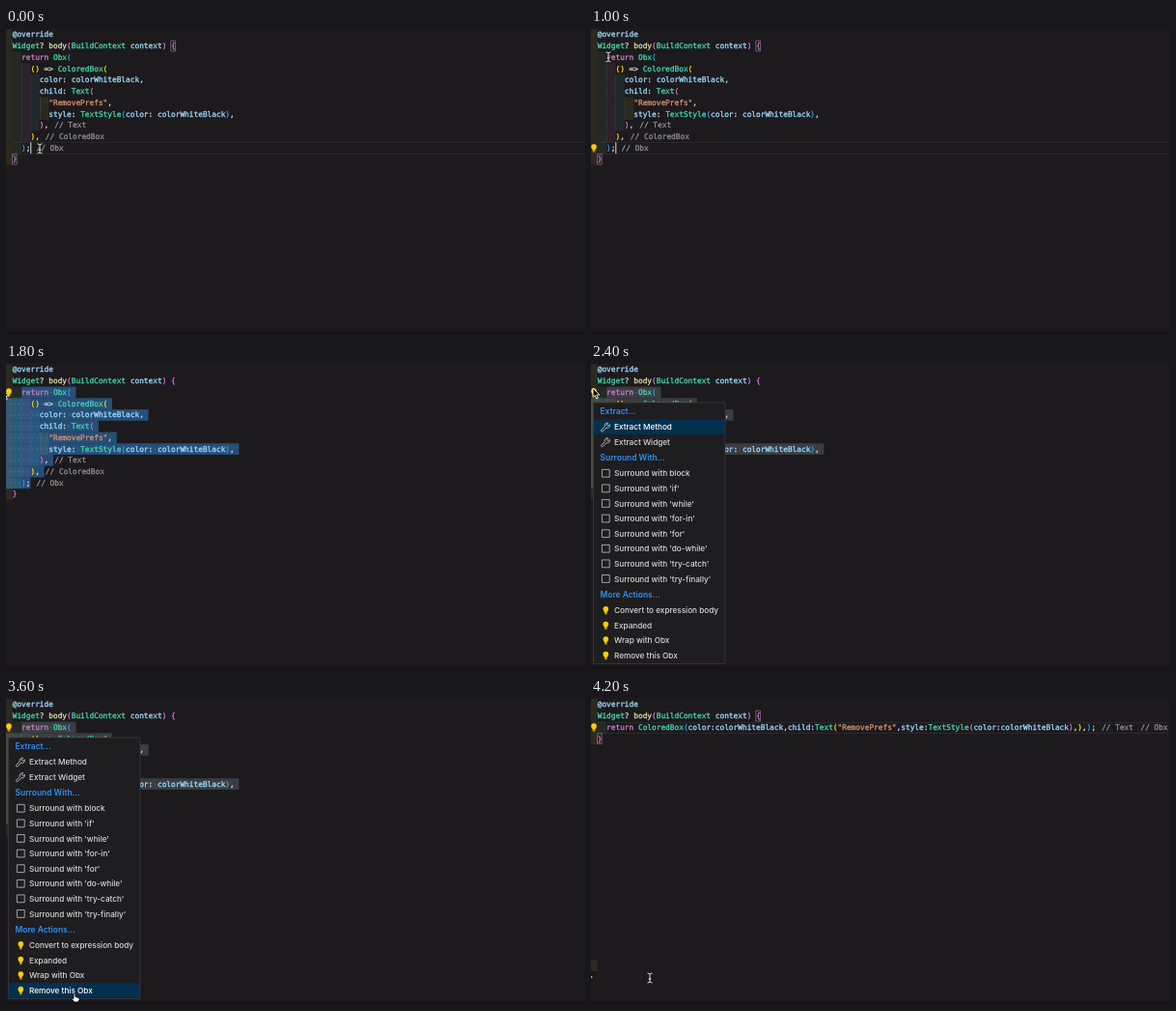
An HTML page with a canvas for the animation above (4300 ms loop, 600 by 318 pixels).

```html
<!DOCTYPE html>
<html lang="en">
<head>
<meta charset="utf-8">
<title>Editor quick fix</title>
<style>
  html, body { margin: 0; width: 600px; height: 318px; overflow: hidden; background: #1c1a1c; }
  canvas { display: block; }
</style>
</head>
<body>
<canvas id="stage" width="600" height="318"></canvas>
<script>
const ctx = document.getElementById('stage').getContext('2d');
const LOOP = 4300, STEP = 100;
const LEFT = 6.7, CHAR = 4.695, LINE = 11.73, TOP = 1.1;
const CODE_FONT = '7.8px "DejaVu Sans Mono", monospace';
const BRACKETS = ['#ffd700', '#da70d6', '#2b9df4'];
const INDENTS = ['255,255,64', '127,255,127', '255,127,255', '79,236,236'];

// Each line: indent, code, closing labels
const before = [
  [0, '@override'],
  [0, 'Widget? body(BuildContext context) {'],
  [2, 'return Obx('],
  [4, '() => ColoredBox('],
  [6, 'color: colorWhiteBlack,'],
  [6, 'child: Text('],
  [8, '"RemovePrefs",'],
  [8, 'style: TextStyle(color: colorWhiteBlack),'],
  [6, '),', '// Text'],
  [4, '),', '// ColoredBox'],
  [2, ');', '// Obx'],
  [0, '}']
];
const after = [
  before[0], before[1],
  [2, 'return ColoredBox(color:colorWhiteBlack,child:Text("RemovePrefs",style:TextStyle(color:colorWhiteBlack),),);', '// Text', '// Obx'],
  [0, '}']
];

const MENU = { x: 2.5, y: 41, w: 136.5, h: 270.5, pad: 0.55, head: 16.9, item: 15.6 };
let menuBottom = MENU.y + MENU.pad;
const menu = ['#Extract...', 'Extract Method', 'Extract Widget', '#Surround With...',
  'Surround with block', "Surround with 'if'", "Surround with 'while'", "Surround with 'for-in'",
  "Surround with 'for'", "Surround with 'do-while'", "Surround with 'try-catch'",
  "Surround with 'try-finally'", '#More Actions...', 'Convert to expression body',
  'Expanded', 'Wrap with Obx', 'Remove this Obx'].map(entry => {
  const heading = entry[0] === '#', height = heading ? MENU.head : MENU.item;
  menuBottom += height;
  return { label: entry.replace('#', ''), heading, bottom: menuBottom, y: menuBottom - height / 2 };
});

// Pointer keys: time, x, y
const path = [[0, 35, 125], [200, 35, 125], [900, 18, 30], [1300, 18, 30], [1700, -4, 27],
  [2000, -4, 27], [2300, 2, 26], [2400, 2, 26], [2900, 64, 260.5], [3100, 64, 260.5],
  [3500, 71, 306], [3800, 71, 306], [4100, 61, 290], [4300, 61, 290]];

const colX = col => LEFT + col * CHAR;
const rowY = row => TOP + row * LINE;

function rect(color, x, y, w, h) {
  ctx.fillStyle = color;
  ctx.fillRect(x, y, w, h);
}

function text(str, x, y, color) {
  ctx.fillStyle = color;
  ctx.fillText(str, x, y);
}

// A hairline outline gives the code its heavier smoothing.
function codeText(str, x, y, color) {
  text(str, x, y, color);
  ctx.strokeStyle = color;
  ctx.lineWidth = 0.3;
  ctx.strokeText(str, x, y);
}

function pointerAt(t) {
  const i = Math.max(1, path.findIndex(k => k[0] > t));
  const [t0, x0, y0] = path[i - 1], [t1, x1, y1] = path[i];
  const u = (t - t0) / (t1 - t0), e = u * u * (3 - 2 * u);
  return { x: x0 + (x1 - x0) * e, y: y0 + (y1 - y0) * e };
}

function tokenColor(token, next) {
  if (token === 'return') return '#c97fc4';
  if (token[0] === '"') return '#d6936f';
  if (/^[A-Z]/.test(token)) return '#46d6b0';
  if (/^[@a-z]/.test(token)) return next === '(' ? '#dcdcaa' : '#9cdcfe';
  return '#d4d4d4';
}

function drawLines(lines) {
  let depth = 1;
  ctx.font = CODE_FONT;
  ctx.lineJoin = 'round';
  lines.forEach(([indent, code, ...labels], row) => {
    const y = rowY(row) + 8.35;
    for (const m of code.matchAll(/"[^"]*"|@?\w+|[(){}]|[^\s\w(){}"]+/g)) {
      const token = m[0];
      let color = tokenColor(token, code[m.index + token.length]);
      if (/[)}]/.test(token)) depth--;
      if (/[(){}]/.test(token)) color = BRACKETS[depth % 3];
      if (/[({]/.test(token)) depth++;
      codeText(token, colX(indent + m.index), y, color);
    }
    let x = colX(indent + code.length) + 6;
    for (const label of labels) {
      codeText(label, x, y, '#918f91');
      x += label.length * CHAR + 7.5;
    }
  });
}

function drawIndents(lines) {
  lines.forEach(([indent], row) => {
    for (let col = -2; col < indent; col += 2) {
      rect(`rgba(${INDENTS[(col + 2) / 2 % 4]},.07)`, colX(col), rowY(row), 2 * CHAR, LINE);
      if (col > 0) rect('rgba(200,200,200,.13)', Math.round(colX(col)), rowY(row), 0.7, LINE);
    }
  });
}

function drawSelection(color) {
  for (let row = 2; row <= 10; row++) {
    const [indent, code] = before[row];
    const start = row === 2 ? colX(indent) : 0;
    const end = colX(indent + code.length + (row < 10 ? 1 : 0));
    rect(color, start, rowY(row), end - start, LINE);
    const line = ' '.repeat(indent + 2) + code;
    for (let i = 0; i < line.length; i++) {
      const x = colX(i - 1.5);
      if (line[i] === ' ' && x > start) rect('rgba(227,228,226,.3)', x - 0.5, rowY(row) + 5.5, 1, 1);
    }
  }
}

function drawActiveLine(row) {
  rect('#2a282a', 7, Math.round(rowY(row)), 593, 1);
  rect('#2a282a', 7, Math.round(rowY(row + 1)), 593, 1);
}

function drawBracketBox(col, row) {
  ctx.strokeStyle = '#858385';
  ctx.lineWidth = 0.7;
  ctx.strokeRect(colX(col) - 0.2, rowY(row) + 0.4, CHAR, LINE - 1);
}

function drawBulb(x, y) {
  rect('#b98b1a', x - 1.3, y + 2, 2.6, 2.4);
  ctx.fillStyle = '#ffcc0a';
  ctx.beginPath();
  ctx.arc(x, y - 1.2, 2.8, 0, 7);
  ctx.fill();
  rect('#ffcc0a', x - 1.5, y, 3, 2.4);
}

function drawWrench(x, y) {
  ctx.strokeStyle = '#c5c5c5';
  ctx.lineWidth = 0.9;
  ctx.stroke(new Path2D(`M${x + 2.8} ${y - 4}a2.7 2.7 0 0 0 -3.4 3.5l-3.6 3.4a1 1 0 0 0 1.5 1.5l3.5 -3.5a2.7 2.7 0 0 0 3.5 -3.4l-1.7 1.5l-1.4 -1.4z`));
}

function drawMenu(pointer) {
  const active = menu.find(entry => !entry.heading && entry.bottom > pointer.y) || menu[menu.length - 1];
  rect('#1e1d1f', MENU.x, MENU.y, MENU.w, MENU.h);
  rect('#04304f', MENU.x, active.bottom - MENU.item, MENU.w, MENU.item);
  ctx.strokeStyle = '#3b393b';
  ctx.lineWidth = 0.8;
  ctx.strokeRect(MENU.x, MENU.y, MENU.w, MENU.h);
  menu.forEach((entry, i) => {
    const { label, heading, y } = entry;
    if (heading) {
      ctx.font = '600 8.45px Inter, sans-serif';
      text(label, 9.5, y + 3, '#3090f5');
      return;
    }
    ctx.font = '500 8.2px Inter, sans-serif';
    text(label, 24, y + 3, entry === active ? '#ffffff' : '#d8d8d8');
    if (i < 3) drawWrench(15, y);
    else if (i < 12) {
      ctx.strokeStyle = '#c5c5c5';
      ctx.lineWidth = 0.8;
      ctx.strokeRect(11.4, y - 4, 7.8, 7.8);
    } else drawBulb(15.3, y);
  });
}

function drawPointer(kind, { x, y }) {
  ctx.save();
  ctx.translate(x, y);
  ctx.lineJoin = 'round';
  if (kind === 'beam') {
    const beam = new Path2D('M-2.5 -5Q0 -5 0 -3.5Q0 -5 2.5 -5M0 -3.5V3.5M-2.5 5Q0 5 0 3.5Q0 5 2.5 5M-1.3 1H1.3');
    ctx.strokeStyle = '#111';
    ctx.lineWidth = 2.4;
    ctx.stroke(beam);
    ctx.strokeStyle = '#eee';
    ctx.lineWidth = 1;
    ctx.stroke(beam);
  } else {
    const arrow = 'M0 0V9.5L2.2 7.5L3.7 11L5.3 10.3L3.8 7H6.8Z';
    const hand = 'M-1 .5Q0 -.8 1 .5V3.5L4.5 4.5Q5.3 5 5 6.5L4 9H-.2L-3 5.7Q-2.5 4.3 -1 5.5Z';
    const shape = new Path2D(kind === 'hand' ? hand : arrow);
    ctx.fillStyle = kind === 'hand' ? '#fff' : '#000';
    ctx.strokeStyle = kind === 'hand' ? '#000' : '#fff';
    ctx.lineWidth = 0.9;
    ctx.fill(shape);
    ctx.stroke(shape);
  }
  ctx.restore();
}

function draw(t) {
  const done = t >= 3900;
  const selected = t >= 1200 && !done;
  const menuOpen = t >= 2200 && t < 3800;
  const lines = done ? after : before;
  const activeRow = done ? 2 : 10;
  const pointer = pointerAt(t);

  rect('#1c1a1c', 0, 0, 600, 318);
  rect('#161416', 0, 314, 600, 4);
  if (selected) drawSelection(menuOpen ? '#3a3d41' : '#264f78');
  else drawActiveLine(activeRow);
  drawIndents(lines);
  if (!selected) {
    drawBracketBox(35, 1);
    drawBracketBox(0, lines.length - 1);
  }
  drawLines(lines);
  if (t < 1200) rect('#e0e0e0', colX(4) - 0.2, rowY(10), 1, LINE);
  if (t >= 400) drawBulb(3, rowY(selected ? 2 : activeRow) + 5.8);
  if (done) {
    rect('rgba(255,255,64,.07)', 0, 271, 6.7, 12);
    rect('#d9ae12', 0, 288, 1.3, 2);
  }
  if (menuOpen) drawMenu(pointer);

  let kind = 'beam';
  if (t >= 1500 && !done) kind = menuOpen && pointer.y > MENU.y ? 'hand' : 'arrow';
  drawPointer(kind, pointer);
}

function frame() {
  draw(Math.floor(performance.now() % LOOP / STEP) * STEP);
  requestAnimationFrame(frame);
}
frame();
</script>
</body>
</html>
```
